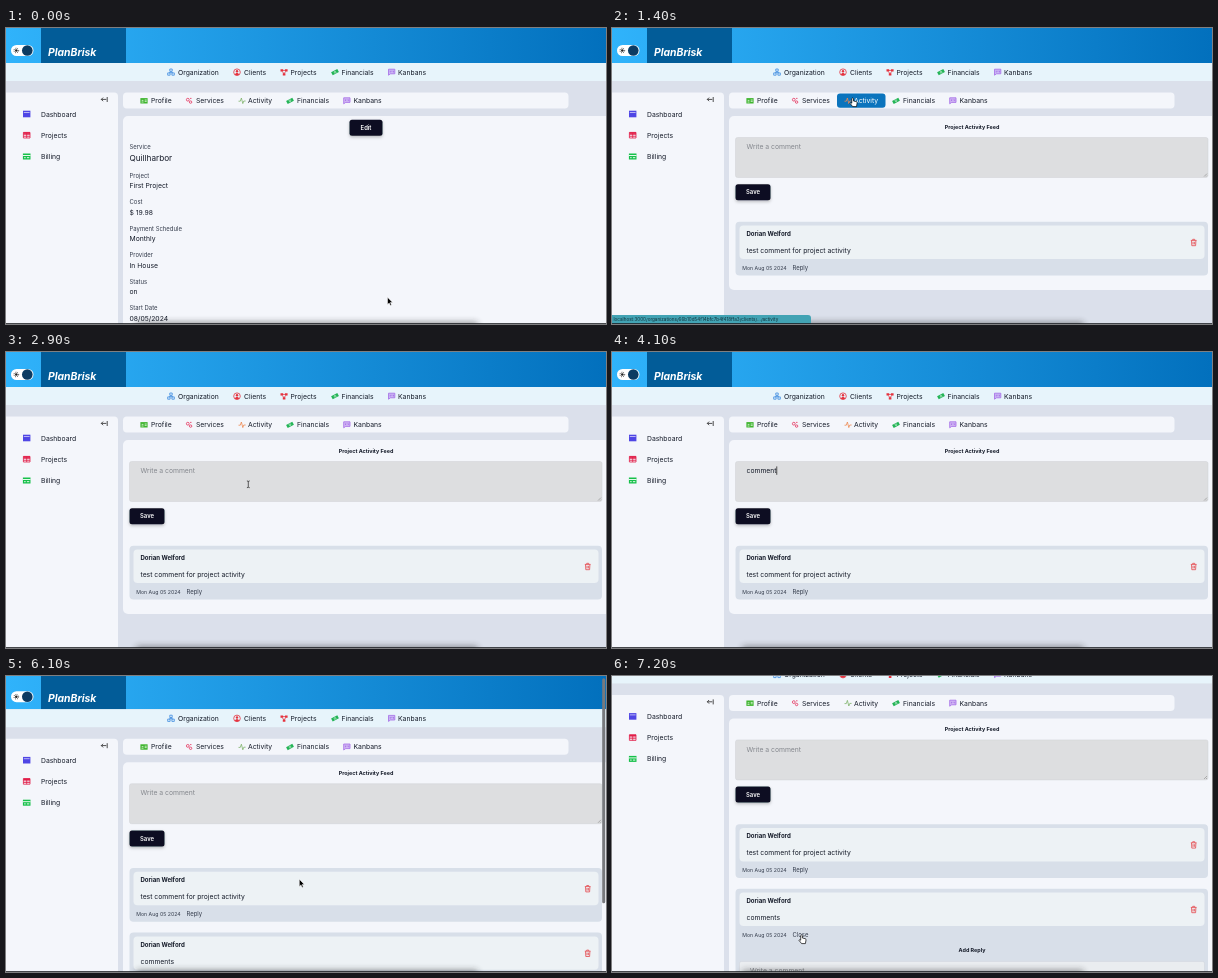
Write an HTML page that moves like this. It is 600 by 296 pixels and loops after 8 s.

```html
<!DOCTYPE html>
<html lang="en">
<head>
<meta charset="utf-8">
<title>Project activity feed</title>
<style>
  html, body { margin: 0; width: 100%; height: 100%; overflow: hidden; }
  svg { display: block; width: 100vw; height: 100vh; font: 6.8px Inter, sans-serif; }
  text { fill: #141a28; white-space: pre; }
  .icon { fill: none; stroke: currentColor; stroke-width: .8; stroke-linejoin: round; }
  .icon .solid { fill: currentColor; stroke: none; }
  .label { font-size: 5.95px; fill: #333b4b; }
  .heading { font-size: 5.4px; font-weight: 700; text-anchor: middle; }
  .author { font-size: 6.05px; font-weight: 700; }
  .button { font-size: 5.9px; font-weight: 600; fill: #fff; text-anchor: middle; }
  .date { font-size: 5.2px; fill: #333b4b; }
  .hint { fill: #85888e; }
</style>
</head>
<body>
<svg id="stage" viewBox="0 0 600 296"></svg>
<script>
const LOOP = 8000, STEP = 100;
const INK = '#0b1120', PANEL = '#f4f6fb', CARD = '#d8dfe9';

const text = (x, y, content, cls = '', extra = '') =>
  `<text x="${x}" y="${y}" class="${cls}" ${extra}>${content}</text>`;
const rect = (x, y, w, h, fill, r = 0, extra = '') =>
  `<rect x="${x}" y="${y}" width="${w}" height="${h}" rx="${r}" fill="${fill}" ${extra}/>`;
const group = (id, content) => `<g id="${id}">${content}</g>`;

const icons = {
  organization: '<path d="M-1.2-3.2h2.4v2.3h-2.4zM-3.3.7h2.4V3h-2.4zM.9.7h2.4V3H.9zM0-.9v1M-2 .7L0 0l2 .7"/>',
  client: '<circle r="3.3"/><circle class="solid" cy="-.9" r="1.2"/><path class="solid" d="M-2.3 2.2Q0-1 2.3 2.2Q0 4-2.3 2.2"/>',
  project: '<path class="solid" d="M-3.5-3h2.6v2.4h-2.6zM1-3h2.6v2.4H1zM-1.2 1h2.6v2.4h-2.6z"/><path d="M-1-1.8h2M-1.8-.8L0 1.5l1.8-2.3"/>',
  financial: '<g transform="rotate(-28)"><path class="solid" d="M-3.5-1.7h7v3.4h-7z"/><circle r=".9" stroke="#fff" stroke-width=".5"/></g>',
  kanban: '<path class="solid" opacity=".45" d="M-3-3h6.3v4.6H-1L-3 3z"/><path d="M-3-3h6.3v4.6H-1L-3 3zM-1.2-1.4v1.6M.4-1.4v1M2-1.4v1.6"/>',
  profile: '<path class="solid" d="M-3.6-2.7h7.2v5.4h-7.2z"/><path stroke="#fff" stroke-width=".7" d="M-2.3-.4h1.7M-2.5 1.2h2M.7-.8h2M.7.6h2"/>',
  service: '<circle cx="-1.2" cy="-1.1" r="1.4"/><circle cx="1.6" cy="1.3" r="1.2"/><path d="M1-2.4h1.5"/>',
  activity: '<path d="M-3.5.4h1.8L-.6-2.8.8 2.8 1.8.2h1.8"/>',
  dashboard: '<path class="solid" d="M-3.7-3.3h7.4v6.6h-7.4z"/><path stroke="#fff" stroke-width=".6" d="M-2.9-1.5h5.8"/>',
  table: '<path d="M-3.3-2.8h6.6v5.6h-6.6zM-3.3-.6h6.6M-3.3 1.1h6.6M0-2.4v5.2"/><path class="solid" d="M-3.3-3h6.6v1.7h-6.6z"/>',
  billing: '<path class="solid" d="M-3.8-3h7.6v6h-7.6z"/><path stroke="#fff" stroke-width=".9" d="M-3.8-1h7.6M-2.6 1.2h1.6M.2 1.2h2.4"/>',
  trash: '<path d="M-2.9-2.1h5.8M-1-2.2v-1h2v1M-2.2-2l.3 5.2h3.8L2.2-2M-.7-.7v2.6M.7-.7v2.6"/>',
  collapse: '<path d="M2.9-2.5v5M2-.1h-5M-1.2-1.9L-3-.1l1.8 1.8"/>'
};
const icon = (name, x, y, color, id = '') =>
  `<g class="icon" ${id && `id="${id}"`} color="${color}" transform="translate(${x} ${y})">${icons[name]}</g>`;

const menu = (items, y) => items.map(([name, color, iconX, x, label]) =>
  icon(name, iconX, y, color, name === 'activity' ? 'activityIcon' : '') +
  text(x, y + 2.5, label, '', name === 'activity' ? 'id="activityLabel"' : '')).join('');

const button = (x, y, w, label, id) =>
  rect(x, y, w, 16, INK, 2.5, `id="${id}" filter="url(#lift)"`) + text(x + w / 2, y + 10.2, label, 'button');

const comment = (y, body, replyId) =>
  rect(127.5, y + 3.8, 465, 33.4, '#edf2f5', 4) +
  text(134.5, y + 14, '<tspan>Dorian Welford</tspan>', 'author') +
  text(134.5, y + 31.2, body) +
  icon('trash', 581.7, y + 20.7, '#e5484d') +
  text(130.3, y + 47.8, 'Mon Aug 05 2024', 'date') +
  text(180.5, y + 48, 'Reply', 'label', `id="${replyId}"`);

const fields = [['Project', 'First Project'], ['Cost', '$ 19.98'], ['Payment Schedule', 'Monthly'],
  ['Provider', 'In House'], ['Status', 'on'], ['Start Date', '08/05/2024']];

const header =
  rect(0, 0, 600, 35, 'url(#sky)') + rect(35, 0, 85, 35, '#025c98') +
  rect(5, 17, 22.5, 11, '#fff', 5.5) +
  '<circle cx="21.3" cy="22.5" r="5.3" fill="#0c3b62"/>' +
  '<circle cx="10.3" cy="22.5" r="1.3" fill="#222"/><circle cx="10.3" cy="22.5" r="2.3" fill="none" stroke="#222" stroke-width=".9" stroke-dasharray=".8 1"/>' +
  text(42, 28, 'PlanBrisk', '', 'style="font:italic 700 10.4px Inter,sans-serif;fill:#fff"') +
  rect(0, 35, 600, 18, '#e7f4fb') +
  menu([['organization', '#3d8be0', 165, 172, 'Organization'], ['client', '#e5323e', 231, 238, 'Clients'],
    ['project', '#e5323e', 278, 284.5, 'Projects'], ['financial', '#22b455', 329, 335.5, 'Financials'],
    ['kanban', '#a56be8', 385.5, 392, 'Kanbans']], 44.2);

const sidebar =
  '<path d="M0 64.5h108q4 0 4 4V600H0z" fill="' + PANEL + '"/>' +
  icon('collapse', 98.3, 71.5, '#222') +
  menu([['dashboard', '#4f46e5', 20.7, 35, 'Dashboard'], ['table', '#e11d48', 20.7, 35, 'Projects'],
    ['billing', '#16b04a', 20.7, 35, 'Billing']].slice(0, 1), 86) +
  menu([['table', '#e11d48', 20.7, 35, 'Projects']], 107.2) +
  menu([['billing', '#16c04a', 20.7, 35, 'Billing']], 128.5);

const tabs =
  rect(117, 64.5, 445.5, 16, PANEL, 4) + rect(225, 65.5, 48.5, 14.3, '#0b74bd', 3, 'id="activeTab"') +
  menu([['profile', '#3fb52f', 138, 145, 'Profile'], ['service', '#e5325c', 183, 190, 'Services'],
    ['activity', '#7fb36b', 236, 242, 'Activity'], ['financial', '#22b455', 284, 291, 'Financials'],
    ['kanban', '#a56be8', 340.7, 347.5, 'Kanbans']], 72.8);

const service =
  button(343.5, 91.7, 33, 'Edit', 'edit') +
  text(123.5, 121.3, 'Service', 'label') + text(123.5, 133.1, 'Quillharbor', '', 'style="font-size:8.2px"') +
  fields.map(([label, value], i) =>
    text(123.5, 149.7 + i * 26.55, label, 'label') + text(123.5, 160 + i * 26.55, value)).join('');

const feed =
  text(360, 101, 'Project Activity Feed', 'heading') +
  rect(123.5, 109.5, 472.5, 40, '#dddee0', 2, 'stroke="#cfd1d5" stroke-width=".5"') +
  '<path d="M592 148.6l3-3M594 148.6l1-1" stroke="#777" stroke-width=".5"/>' +
  text(134.5, 121.3, '', '', 'id="entry"') + rect(134.4, 114.4, .7, 8.4, '#111', 0, 'id="caret"') +
  button(123.5, 156.2, 35, 'Save', 'save') +
  rect(123.5, 193.8, 472.5, 53.8, CARD, 4) + comment(193.8, 'test comment for project activity', 'reply1') +
  group('second', rect(123.5, 258.4, 472.5, 53.8, CARD, 4, 'id="secondCard"') + comment(258.4, 'comments', 'reply2')) +
  group('replyForm', text(360, 321.6, 'Add Reply', 'heading') +
    rect(127.5, 331, 465, 40, '#eaedf0', 2, 'stroke="#cfd3da" stroke-width=".5"') +
    text(138, 342.2, 'Write a comment', 'hint'));

const cursors = {
  arrow: '<path d="M0 0v7.2l1.7-1.5 1.1 2.5 1.2-.5-1.1-2.5h2.2z" fill="#000" stroke="#fff" stroke-width=".5"/>',
  hand: '<path d="M-.9.6Q0-.7.8.6V3l3 .7q.8.3.6 1.4L3.8 8.6H0L-2.6 5.4q0-1.2 1.7-.2z" fill="#fff" stroke="#000" stroke-width=".7"/>',
  beam: '<path d="M-1.4-3.4q1.4 0 1.4.9v5q0 .9-1.4.9M1.4-3.4Q0-3.4 0-2.5M1.4 3.4Q0 3.4 0 2.5" fill="none" stroke="#222" stroke-width=".7"/>'
};

const stage = document.getElementById('stage');
stage.innerHTML = `
  <defs>
    <linearGradient id="sky"><stop stop-color="#30b3fb"/><stop offset="1" stop-color="#0270bd"/></linearGradient>
    <filter id="lift" x="-20%" y="-20%" width="140%" height="170%"><feDropShadow dx="0" dy="1.5" stdDeviation="1.5" flood-opacity=".25"/></filter>
    <filter id="soft" x="-10%" y="-200%" width="120%" height="500%"><feGaussianBlur stdDeviation="3"/></filter>
  </defs>` +
  rect(0, 0, 600, 296, '#dbe0eb') +
  group('page', header + sidebar + tabs + rect(117, 88, 490, 300, PANEL, 5, 'id="panel"') +
    group('service', service) + group('feed', feed)) +
  rect(596.2, 1, 3, 225, '#77797d', 1.5, 'id="thumb"') +
  rect(130, 294, 342, 8, '#222', 3, 'filter="url(#soft)" opacity=".45"') +
  group('status', '<path d="M0 287h196q3 0 3 3v6H0z" fill="#42a3b4"/>' +
    text(1.5, 293.4, 'localhost:3000/organizations/66b10d54f14bfc7b4f418ffa3/clients/.../activity', '', 'style="font-size:4.6px;fill:#12343c"')) +
  rect(0, 295.2, 600, .8, '#1a1c20') +
  group('pointer', Object.entries(cursors).map(([id, shape]) => group(id, shape)).join(''));

const el = id => document.getElementById(id);
const set = (id, name, value) => el(id).setAttribute(name, value);
const show = (id, visible) => set(id, 'visibility', visible ? 'visible' : 'hidden');

// Keys are [time, ...values]; values ease between neighbouring keys.
function sample(keys, t) {
  const next = keys.findIndex(key => key[0] > t);
  if (next < 0) return keys.at(-1).slice(1);
  const a = keys[next - 1], b = keys[next], p = (t - a[0]) / (b[0] - a[0]);
  return a.slice(1).map((v, i) => v + (b[i + 1] - v) * p * p * (3 - 2 * p));
}
const latest = (keys, t) => keys.findLast(key => key[0] <= t)[1];

const path = [[0, 381.5, 269.3], [600, 381.5, 269.3], [1200, 240.7, 70], [1500, 240.7, 70], [2200, 242.3, 132.3],
  [4600, 242.3, 132.3], [4700, 203, 141], [5100, 142.7, 165.6], [5500, 142.7, 165.6], [6000, 293.3, 203.2],
  [6400, 293.3, 203.2], [7000, 189.6, 259]];
const shapes = [[0, 'arrow'], [1100, 'hand'], [1600, 'arrow'], [1900, 'beam'], [3200, 'none'],
  [4700, 'beam'], [4900, 'arrow'], [5000, 'hand'], [5600, 'arrow'], [6900, 'hand']];
const scrolling = [[0, 0], [6000, 0], [6100, 1.8], [6200, 27], [6300, 45.6]];
const tabFill = [[0, 0], [1000, 0], [1200, 1], [2300, 1], [2500, 0]];
const thumbFade = [[0, 0], [6000, 0], [6100, 1], [6600, 1], [6900, 0]];
const keystrokes = [3200, 3300, 3400, 3600, 3700, 3900, 4100, 4400];

function draw(t) {
  const between = (from, to) => t >= from && t < to;
  const onFeed = t >= 1300, posted = t >= 5500, replying = t >= 7100;

  const [scroll] = sample(scrolling, t);
  set('page', 'transform', `translate(0 ${-scroll})`);
  set('thumb', 'y', 1 + scroll * .75);
  set('thumb', 'opacity', sample(thumbFade, t)[0]);

  el('service').style.display = onFeed ? 'none' : '';
  el('feed').style.display = onFeed ? '' : 'none';
  el('second').style.display = posted ? '' : 'none';
  el('replyForm').style.display = replying ? '' : 'none';
  set('panel', 'height', !onFeed || replying ? 340 : posted ? 238.5 : 174);
  set('secondCard', 'height', replying ? 140 : 53.8);
  el('reply2').textContent = replying ? 'Close' : 'Reply';

  const [active] = sample(tabFill, t);
  set('activeTab', 'opacity', active);
  el('activityLabel').style.fill = active > .5 ? '#fff' : '';
  set('activityIcon', 'color', between(1300, 5500) ? '#ee8a52' : '#7fb36b');
  show('status', between(1100, 1700));

  const typed = t < 5200 ? 'comments'.slice(0, keystrokes.filter(k => k <= t).length) : '';
  const entry = el('entry');
  entry.textContent = typed || 'Write a comment';
  entry.setAttribute('class', typed ? '' : 'hint');
  set('caret', 'x', 134.4 + (typed && onFeed ? entry.getComputedTextLength() : 0));
  show('caret', between(2400, 2900) || between(3200, 4900));
  set('save', 'fill', between(5000, 5600) ? '#1d2433' : INK);

  const shape = latest(shapes, t);
  Object.keys(cursors).forEach(id => show(id, id === shape));
  set('pointer', 'transform', `translate(${sample(path, t).join(' ')})`);
}

const start = performance.now();
function tick(now) {
  const t = Math.max(0, now - start) % LOOP;
  draw(Math.floor(t / STEP) * STEP);
  requestAnimationFrame(tick);
}
draw(0);
requestAnimationFrame(tick);
</script>
</body>
</html>
```
